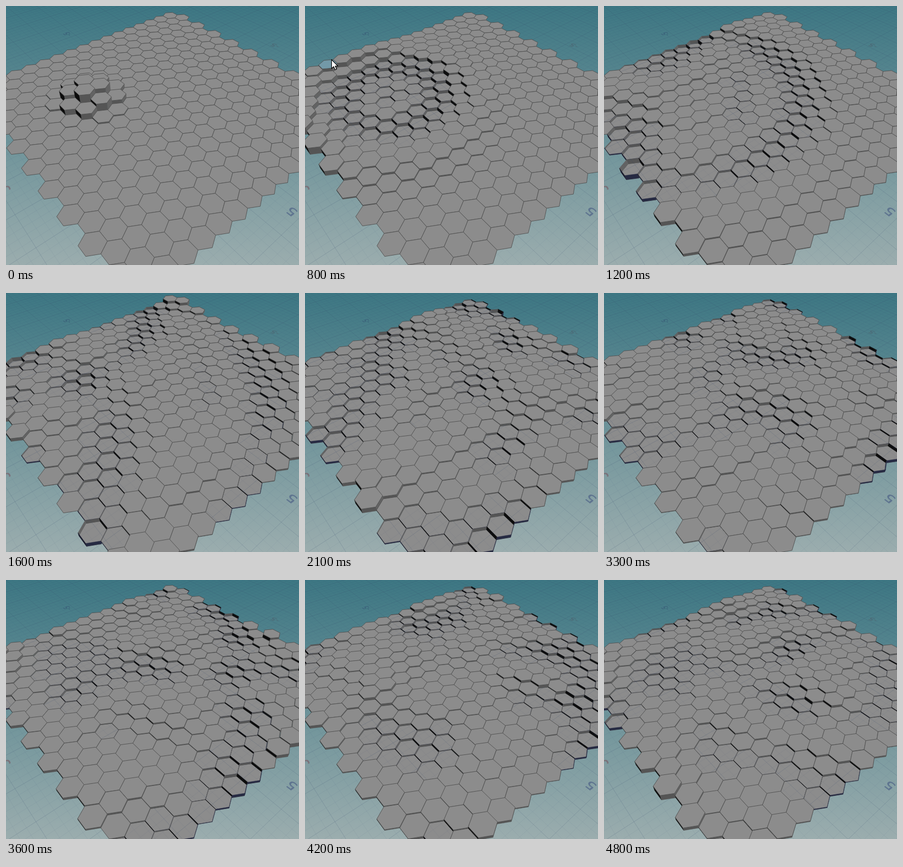
These frames come from a looping animation (557x493 px, 4900 ms). An HTML page with a canvas:

```html
<!DOCTYPE html>
<html lang="en">
<head>
<meta charset="utf-8">
<title>Hexagon ripple</title>
<style>
  html, body { margin: 0; width: 100%; height: 100%; overflow: hidden; background: #6d959c; }
  canvas { display: block; }
</style>
</head>
<body>
<canvas id="stage" width="557" height="493"></canvas>
<script>
const W = 557, H = 493, LOOP = 4900;
const ROWS = 19, FRAMES = 42;
const canvas = document.getElementById('stage');
const ctx = canvas.getContext('2d');

// Perspective: x runs along a row of tiles, r counts rows, z is height.
const NADIR = { x: 271, y: 912 };
const LIFT = -0.0252;
function depth(x, r, z = 0) {
  return 1 - 0.016598 * x - 0.01669 * r + LIFT * z;
}
function project(x, r, z = 0) {
  const d = depth(x, r, z);
  return [
    (312 - 22.914 * x + 8.293 * r + LIFT * z * NADIR.x) / d,
    (18 + 6.518 * x + 6.902 * r + LIFT * z * NADIR.y) / d
  ];
}

// Odd rows hold one tile more and stick out at both ends.
const tiles = [];
const byKey = new Map();
const key = (x, r) => x * 2 + ',' + r;
for (let r = 0; r < ROWS; r++) {
  const odd = r % 2;
  for (let c = 0; c < 16 + odd; c++) {
    const tile = { x: c - odd / 2, r };
    byKey.set(key(tile.x, r), tiles.length);
    tiles.push(tile);
  }
}
const STEPS = [[1, 0], [0.5, 1], [-0.5, 1], [-1, 0], [-0.5, -1], [0.5, -1]];
for (const t of tiles) {
  t.near = STEPS.map(([dx, dr]) => byKey.get(key(t.x + dx, t.r + dr)))
    .filter(i => i !== undefined);
}
const order = tiles.map((_, i) => i)
  .sort((a, b) => depth(tiles[b].x, tiles[b].r) - depth(tiles[a].x, tiles[a].r));

// Damped wave equation on the lattice, started from a smooth bump.
function simulate() {
  const center = { x: 10.6, r: 5.7 }, reach = 2.5;
  const pace = 0.15, damping = 0.992;
  let now = tiles.map(t => {
    const d = Math.hypot(t.x - center.x, (t.r - center.r) * 0.866);
    return d < reach ? Math.cos(Math.PI / 2 * d / reach) ** 2 : 0;
  });
  let before = now.slice();
  const frames = [];
  for (let n = 0; n < FRAMES; n++) {
    const gain = Math.min(1.4, 1 + 0.1 * n);
    frames.push(now.map(z => Math.abs(z) < 0.004 ? 0 : z * gain));
    for (let s = 0; s < 2; s++) {
      const next = now.map((z, i) => {
        let pull = 0;
        for (const j of tiles[i].near) pull += now[j] - z;
        return z + (z - before[i]) * damping + pace * pull;
      });
      before = now;
      now = next;
    }
  }
  return frames;
}
const heights = simulate();

function corners(tile, z) {
  return STEPS.map((_, i) => {
    const a = Math.PI / 6 + i * Math.PI / 3;
    return project(tile.x + Math.cos(a) / Math.sqrt(3), tile.r + Math.sin(a) * 2 / 3, z);
  });
}
for (const t of tiles) t.base = corners(t, 0);

function polygon(points, fill, line) {
  ctx.beginPath();
  for (const [x, y] of points) ctx.lineTo(x, y);
  ctx.closePath();
  ctx.fillStyle = fill;
  ctx.fill();
  ctx.strokeStyle = line;
  ctx.stroke();
}

const TOP = '#8c8c8c', EDGE = '#505050', HOVER = '#7399a8';
const SHADE = ['#0c0c0c', '#555555', '#636363'];
const BACK = ['#15172a', '#262a42', '#2d3149'];

function wall(side, low, high, color) {
  const a = (side + 5) % 6;
  polygon([low[a], low[side], high[side], high[a]], color, color);
}

function drawSunken(tile, z) {
  const floor = corners(tile, z);
  ctx.lineWidth = 0.8;
  polygon(floor, TOP, EDGE);
  ctx.lineWidth = 0.5;
  for (const s of [4, 3, 5]) wall(s, floor, tile.base, SHADE[s - 3]);
  for (const s of [0, 2, 1]) wall(s, floor, tile.base, BACK[s]);
}

function drawRaised(tile, z, color) {
  const top = z ? corners(tile, z) : tile.base;
  ctx.lineWidth = 0.5;
  if (z) for (const s of [0, 2, 1]) wall(s, tile.base, top, SHADE[s]);
  ctx.lineWidth = 0.9;
  polygon(top, color, EDGE);
}

// Reference plane with fine and unit lines.
const plane = (u, v) => [7.5 + 1.96 * u, 9 + 2.263 * v];

function makeGrid() {
  const layer = document.createElement('canvas');
  layer.width = W;
  layer.height = H;
  const g = layer.getContext('2d');
  const from = -12, to = 8;
  const line = (p, q) => {
    g.beginPath();
    g.moveTo(...project(...plane(...p)));
    g.lineTo(...project(...plane(...q)));
    g.stroke();
  };
  for (let i = from * 5; i <= to * 5; i++) {
    const u = i / 5;
    g.strokeStyle = `rgba(58,78,112,${i % 5 ? 0.06 : 0.2})`;
    line([u, from], [u, to]);
    line([from, u], [to, u]);
  }
  // Labels read along the rows' normal, their tops facing the long side.
  const label = (text, x, r, color) => {
    const o = project(x, r), e = project(x, r - 0.1155), n = project(x - 0.1, r);
    g.setTransform((e[0] - o[0]) * 10, (e[1] - o[1]) * 10,
      (n[0] - o[0]) * 10, (n[1] - o[1]) * 10, o[0], o[1]);
    g.scale(0.05, 0.05);
    g.fillStyle = color;
    g.font = '600 13px "Open Sans", sans-serif';
    g.textAlign = 'center';
    g.textBaseline = 'middle';
    g.fillText(text, 0, 0);
    g.setTransform(1, 0, 0, 1, 0, 0);
  };
  label('5', 8.12, 19.87, 'rgba(62,80,125,.55)');
  label('5', 17.05, 9.48, 'rgba(120,80,90,.55)');
  label('-5', -2.7, 9.56, 'rgba(80,82,95,.45)');
  label('-5', 7.82, -2.94, 'rgba(50,72,110,.5)');
  return layer;
}
const grid = makeGrid();

const sky = ctx.createLinearGradient(0, 0, 0, H);
sky.addColorStop(0, '#3d7783');
sky.addColorStop(1, '#9badae');

function drawCursor(x, y) {
  const shape = [[0, 0], [0, 17], [4, 13.3], [6.8, 19.5], [9.6, 18.2], [6.9, 12.3], [12, 12.3]];
  ctx.lineWidth = 1.2;
  polygon(shape.map(([dx, dy]) => [x + dx, y + dy]), '#fff', '#000');
}

function frameAt(t) {
  const tick = Math.floor(t / 100);
  if (tick < 4) return 0;
  if (tick < 24) return tick - 3;
  return Math.max(21, tick - 7);
}

function draw(n) {
  const z = heights[n];
  const pointing = n === 5;
  const hovered = pointing ? byKey.get(key(12, 0)) : -1;
  ctx.lineJoin = 'round';
  ctx.fillStyle = sky;
  ctx.fillRect(0, 0, W, H);
  for (const i of order) if (z[i] < 0) drawSunken(tiles[i], z[i]);
  ctx.drawImage(grid, 0, 0);
  for (const i of order) {
    if (z[i] >= 0) drawRaised(tiles[i], z[i], i === hovered ? HOVER : TOP);
  }
  if (pointing) drawCursor(50.5, 102);
}

let shown = -1;
function play() {
  const n = frameAt(performance.now() % LOOP);
  if (n !== shown) draw(shown = n);
  requestAnimationFrame(play);
}
play();
</script>
</body>
</html>
```
